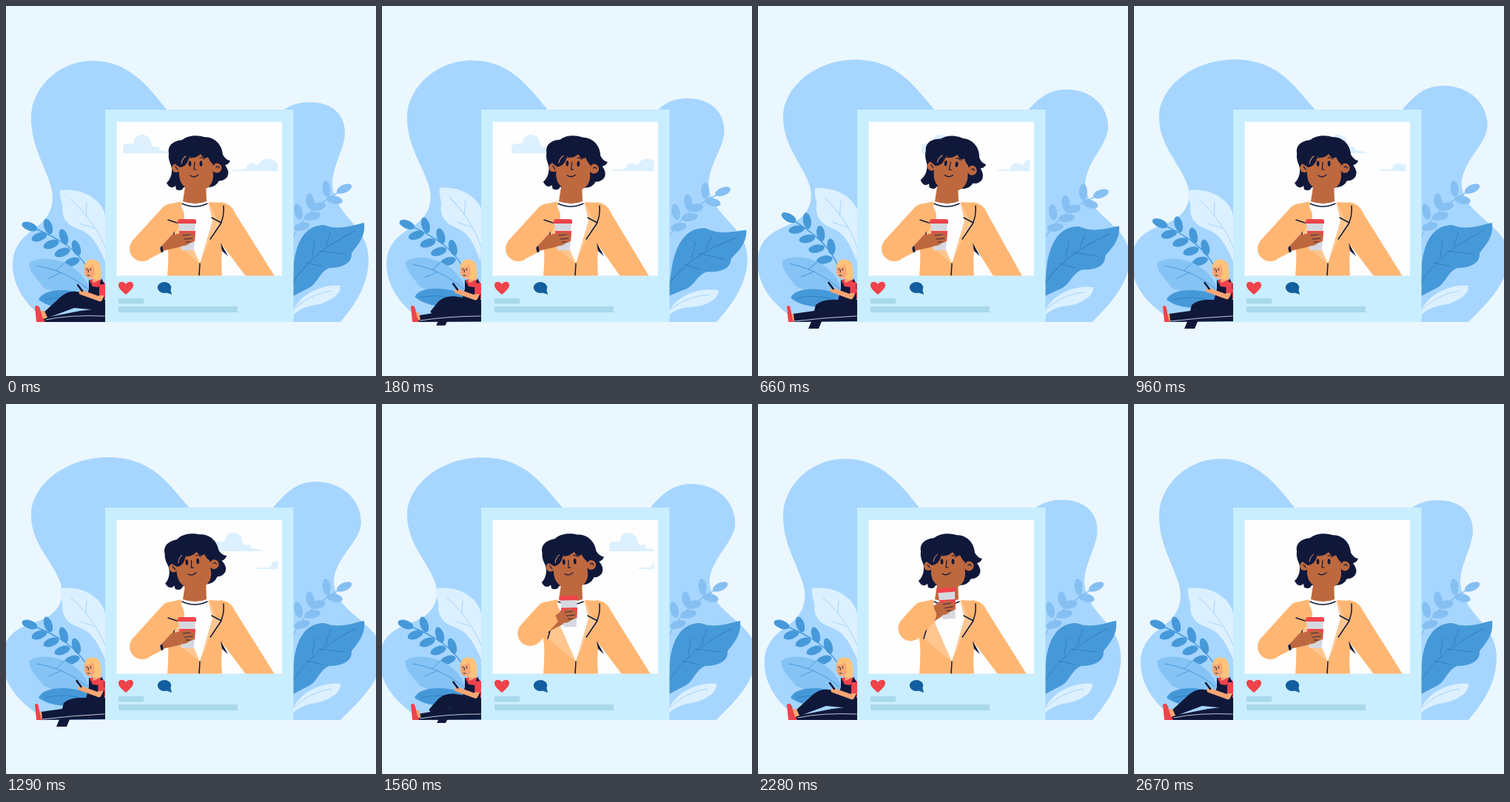
Recreate the animation shown at these times as an HTML page. Size 500x500 px, loop 2.73 s.

```html
<!DOCTYPE html>
<html lang="en">
<head>
<meta charset="utf-8">
<style>
html, body { margin: 0; width: 100%; height: 100%; overflow: hidden; background: #ebf7ff; }
svg { display: block; width: 100%; height: 100%; }
.line { fill: none; stroke-linecap: round; stroke-linejoin: round; }
.flat { stroke-linecap: butt; }
</style>
</head>
<body>
<svg viewBox="0 0 500 500">
  <clipPath id="photo"><path d="M149.500 156.500H373V364.500H149.500Z"/></clipPath>
  <clipPath id="sky"><path d="M158 156H367.500V240H158Z"/></clipPath>
  <path id="blob" fill="#a6d6ff"/>

  <g id="paleLeaf">
    <path fill="#dcf0ff" d="M134 345V283C130 262 105 245 73 249C72 262 78 267 76 276C78 296 92 299 104 304C118 311 125 325 134 345Z"/>
    <path class="line" stroke="#a6d6ff" d="M87 261C110 282 124 302 134 326M108 284L109 265M120 300L99 294"/>
  </g>
  <g id="twig" fill="#4699d9">
    <path class="line" stroke="#4699d9" stroke-width="1.500" d="M35 299C70 313 95 328 110 354"/>
  </g>
  <g id="blueLeaf">
    <path fill="#86c3f5" d="M31 348C39 339 68 338 90 353C105 363 114 378 114 389C94 390 62 388 50 380C44 370 32 362 31 348Z"/>
    <path class="line" stroke="#4699d9" d="M42 351C70 356 90 366 110 382M68 357L78 348M75 360L58 368"/>
  </g>
  <g id="lowLeaf">
    <path fill="#4699d9" d="M44 397C50 382 84 380 114 391V405C85 411 58 408 44 397Z"/>
    <path class="line" stroke="#2f7fc2" d="M52 397Q80 390 110 399"/>
  </g>
  <g id="rightTwig" fill="#86c0f3">
    <path class="line" stroke="#86c0f3" stroke-width="1.500" d="M388 312C402 282 428 262 462 245"/>
  </g>
  <g id="darkLeaf">
    <path fill="#4699d9" d="M386 393L389 347C393 318 404 296 430 296C450 304 468 296 484 293C486 312 476 322 467 334C468 350 450 354 437 354C422 360 422 376 407 382Z"/>
    <path class="line" stroke="#2f7fc2" d="M472 304C435 322 405 345 388 374M432 325L438 306M414 339L417 316M423 331L458 335M405 347L428 352"/>
  </g>
  <g id="whiteLeaf">
    <path fill="#dcf0ff" d="M386 419C390 394 423 375 452 378C453 392 432 403 412 405Q398 408 386 419Z"/>
    <path class="line" stroke="#a6d6ff" d="M440 385Q410 389 388 411"/>
  </g>

  <g id="reader">
    <path id="flatLeg" fill="#10183a"/>
    <path id="calf" fill="#10183a"/>
    <path id="bentLeg" fill="#10183a"/>
    <path id="seam" class="line" stroke="#e8f4ff" stroke-width=".8"/>
    <path id="ankle" fill="#f9a674"/>
    <path id="shoe" fill="#f0434c"/>
    <path fill="#f0434c" d="M112 371Q123 364 134 375V396L112 394Z"/>
    <path fill="#10183a" d="M112 369L117 379L125 380L129 368L133 376V402H107L112 382Z"/>
    <path fill="#f9a674" d="M115 364H125V371L118 374Z"/>
    <path fill="#ffc27a" d="M106 351C108 341 121 340 126 347C129 355 129 363 128 369C122 372 117 369 113 362Z"/>
    <path fill="#f9a674" d="M106 352Q113 354 118 349L120 361C118 370 108 370 106 361Z"/>
    <path class="line" stroke="#10183a" stroke-width=".9" d="M109.500 355V357M114.500 355V357M110 364L113 364M112 356L111 360"/>
    <g id="arms">
      <path class="line" stroke="#f9a674" stroke-width="6.500" d="M131 388L127 396L102 387"/>
      <path class="line flat" stroke="#f0434c" stroke-width="8" d="M130 376V391"/>
      <path class="line" stroke="#10183a" stroke-width="2.500" d="M97 377L103 385"/>
    </g>
  </g>

  <path fill="#c9eeff" d="M134 140H388.500V427H134Z"/>
  <path fill="#fefefe" d="M149.500 156.500H373V364.500H149.500Z"/>
  <g clip-path="url(#sky)" fill="#dcf0ff">
    <path id="cloud" d="M158 199V190Q160 185 167 186Q172 187 173 183C175 171 193 171 196 184Q196 189 200 191Q207 188 208 195Q220 196 224 199Z"/>
    <path id="farCloud" d="M305 223Q307 220 321 221Q325 220 326 215Q330 210 338 214Q342 215 344 210Q350 205 358 207Q365 209 367 214Q380 212 392 223Z"/>
  </g>
  <g clip-path="url(#photo)">
    <path id="farArm" fill="#ffb673"/>
    <path fill="#ffb673" d="M207 279Q214 267 239 264L270 265Q288 265 300 268L293 318Q290 340 292 365H218Q221 330 217 312Z"/>
    <path fill="#fefefe" d="M237 264L273 264L283 286L262 348L238 300Z"/>
    <path fill="#be683f" d="M243 238H270L271 264Q256 270 239 264Z"/>
    <path class="line" stroke="#10183a" stroke-width="1.400" d="M238 267Q255 275 272 267"/>
    <path fill="#ffc68f" d="M237 265L231 293L224 317L262 348L240 298ZM273 265L284 287L291 292L276 315L262 348L279 290Z"/>
    <path class="line" stroke="#10183a" stroke-width="1.500" d="M229 300L224 317M294 270Q295 284 290 294M278 286L291 293L276 315M262 348L261 364"/>
    <path fill="#10183a" d="M290 320L300 338L292 331Z"/>
    <g id="head">
      <path fill="#10183a" d="M220 199C218 187 228 182 238 181C248 173 262 175 268 177C283 177 292 188 293 201Q297 208 303 209Q301 214 296 215Q303 224 299 231Q294 237 288 236Q283 246 270 245L240 245Q238 251 230 248L229 243Q222 249 217 239C224 233 226 221 222 213Q219 206 220 199Z"/>
      <circle cx="230" cy="219" r="6" fill="#be683f"/>
      <circle cx="285" cy="219" r="6.500" fill="#be683f"/>
      <path fill="#be683f" d="M233 200Q250 192 279 201L280 231C279 244 269 250 257 250C244 249 235 242 234 229Z"/>
      <path fill="#10183a" d="M229 214Q229 195 240 192L270 192Q285 196 282 215Q276 212 273 204Q268 209 263 200Q254 208 248 203Q245 217 235 218Z"/>
      <path class="line" stroke="#d99577" d="M237 213Q238 206 243 203"/>
      <path class="line" stroke="#10183a" stroke-width="1.200" d="M255 211L254 221L257 221M249 229Q254 233 260 228M245 207Q248 203 251 205M262 205Q266 204 268 207M284 218Q287 215 288 219M229 217L232 221"/>
      <ellipse cx="248.500" cy="213" rx="1.900" ry="3.800" fill="#10183a"/>
      <ellipse cx="263.500" cy="213" rx="1.900" ry="3.800" fill="#10183a"/>
    </g>
    <path id="forearm" class="line" stroke="#be683f" stroke-width="18"/>
    <path id="cuff" class="line flat" stroke="#10183a" stroke-width="21"/>
    <path id="sleeve" class="line" stroke="#ffb673" stroke-width="34"/>
    <path id="sleeveEnd" fill="#ffb673"/>
    <path id="crease" class="line" stroke="#10183a" stroke-width="1.500" d="M219 289L231 293"/>
    <g id="cup">
      <path fill="#d5d9df" d="M233 293H256L254 330H237Z"/>
      <path fill="#f0434c" d="M234 304H256L255 318H235ZM232 291Q232 288 236 288H254Q257 288 257 291V294H232Z"/>
      <path fill="#be683f" d="M226 314Q234 307 248 305Q251 306 249 309L255 309Q257 312 253 314L254 317Q253 320 249 320Q242 326 230 324Z"/>
      <path class="line" stroke="#10183a" stroke-width=".8" d="M239 310L249 309M241 315L252 314M243 319L249 319"/>
    </g>
  </g>
  <path fill="#f0434c" d="M162 390C155 384 152 381 152 377C152 372 159 371 162 376C165 371 172 372 172 377C172 381 169 384 162 390Z"/>
  <g fill="#135f9f">
    <ellipse cx="214" cy="380.500" rx="9.200" ry="7.500"/>
    <path d="M222 382L224 390L216 387Z"/>
  </g>
  <path fill="#a9d9ec" d="M152 395H186V402.500H152ZM152 406H313V414H152Z"/>
</svg>
<script>
const LOOP = 2730;
const $ = id => document.getElementById(id);
const set = (id, name, value) => $(id).setAttribute(name, value);
const lerp = (a, b, k) => a + (b - a) * k;
const smooth = (a, b, t) => {
  const x = Math.min(1, Math.max(0, (t - a) / (b - a)));
  return x * x * (3 - 2 * x);
};
// Blends two paths that share the same commands.
const blend = ([from, to], k) => {
  const ends = to.match(/-?[\d.]+/g);
  let i = 0;
  return from.replace(/-?[\d.]+/g, n => lerp(+n, +ends[i++], k).toFixed(2));
};
const swing = (t, span) => t < span ? Math.sin(Math.PI * t / span) ** 2 : 0;
const turn = (id, angle, x, y) => set(id, 'transform', `rotate(${angle} ${x} ${y})`);

const blob = [
  'M60 427C36 414 9 385 9 350C9 324 24 311 42 298C58 287 67 268 61 245C54 218 34 190 34 152C34 110 72 74 117 74C165 74 192 108 217 140L300 200L376 140C386 133 397 130 411 130C440 130 458 146 458 171C458 192 441 216 441 241C443 284 490 296 490 342C490 380 468 408 452 427Z',
  'M56 427C26 410 -4 385 -5 345C-4 305 26 300 47 292C70 283 80 265 74 243C64 212 34 190 34 150C34 110 80 72 138 72C200 72 222 112 248 140L300 200L361 140C380 117 395 105 419 105C455 105 480 130 480 160C480 185 446 206 443 238C442 284 508 294 508 338C508 378 470 408 452 427Z'
];
const legs = {
  flatLeg: ['M134 427L50 427L49 422L100 412L134 408Z', 'M134 426L48 427L47 416L90 410L134 404Z'],
  bentLeg: ['M134 397L96 386Q84 384 74 393L51 414L55 422L92 408L134 412Z', 'M134 397L98 397Q84 398 78 404L76 412L80 417L92 415L134 412Z'],
  calf: ['M82 424L80 426L90 426L92 424Z', 'M73 424L68 436L82 436L87 424Z'],
  seam: ['M54 424Q85 417 133 419', 'M49 426Q90 421 133 419'],
  ankle: ['M46 412L52 412L56 421L48 424Z', 'M42 414L48 416L49 426L44 427Z'],
  shoe: ['M39 406Q44 403 46 409L49 420L53 427L41 427Z', 'M39 406Q43 403 44 409L46 420L48 427L41 427Z']
};

function addLeaves(id, leaves) {
  $(id).innerHTML += leaves.map(([x, y, angle]) =>
    `<ellipse rx="11" ry="5.500" transform="translate(${x} ${y}) rotate(${angle})"/>`).join('');
}
addLeaves('twig', [[32, 298, 20], [57, 298, 72], [78, 312, 72], [95, 327, 72],
  [45, 312, -20], [61, 322, -20], [76, 333, -20], [89, 346, -20]]);
addLeaves('rightTwig', [[457, 247, -25], [433, 247, 85], [411, 264, 80], [395, 278, 75],
  [444, 262, 12], [421, 271, -12], [414, 284, -12], [400, 298, -15]]);

function draw(t) {
  const swell = t < 1365 ? Math.sin(Math.PI * t / LOOP) : 1 - smooth(1330, 2380, t);
  set('blob', 'd', blend(blob, swell));

  turn('paleLeaf', 8.5 * swing(t, 820), 134, 330);
  turn('twig', 9.8 * swing(t, 1200), 108, 350);
  turn('blueLeaf', 4 * swing(t, 900), 112, 380);
  turn('lowLeaf', 8 * swing(t, 800), 112, 400);
  turn('rightTwig', 9 * swing(t, 920), 388, 318);
  turn('darkLeaf', 12.5 * swing(t, 780), 388, 385);
  turn('whiteLeaf', 12 * swing(t, 760), 388, 413);

  const stretch = smooth(0, 330, t) - smooth(1380, 1740, t);
  for (const id in legs) set(id, 'd', blend(legs[id], stretch));
  set('arms', 'transform', `translate(${-1.5 * stretch} ${-3 * stretch})`);

  set('cloud', 'transform', `translate(${0.0955 * t})`);
  set('farCloud', 'transform', `translate(${59 * Math.min(1, t / 2280)})`);

  const tilt = 6 * smooth(0, 450, t) - 11 * smooth(700, 1200, t) + 5 * smooth(1400, 1800, t);
  turn('head', tilt, 256, 262);
  const reach = 363 - Math.max(0, tilt);
  set('farArm', 'd', `M288 265Q304 266 309 279L${reach} 365H${reach - 39}L290 320Z`);

  // Lifts the cup to the mouth and back, with the elbow following.
  const lift = smooth(1380, 1780, t) - smooth(2000, 2640, t);
  const dx = 19 * lift, dy = -67 * lift;
  set('cup', 'transform', `translate(${dx} ${dy}) rotate(${-20 * lift ** 3} 245 310)`);
  const elbow = [lerp(184, 222, lift), lerp(328, 286, lift)];
  const hand = [237 + dx, 316 + dy];
  const length = Math.hypot(hand[0] - elbow[0], hand[1] - elbow[1]);
  const along = (k, side = 0) => [
    lerp(elbow[0], hand[0], k) - side * (hand[1] - elbow[1]) / length,
    lerp(elbow[1], hand[1], k) + side * (hand[0] - elbow[0]) / length
  ];
  set('forearm', 'd', `M${elbow}L${hand}`);
  set('cuff', 'd', `M${along(.35)}L${along(.5)}`);
  set('sleeve', 'd', `M224 284L${elbow}`);
  set('sleeveEnd', 'd', `M${along(0, -17)}L${along(.44, -12)}L${along(.44, 11)}L${along(0, 17)}Z`);
  set('crease', 'opacity', 1 - Math.min(1, lift * 3));
}

const start = performance.now();
function frame() {
  draw((performance.now() - start) % LOOP);
  requestAnimationFrame(frame);
}
frame();
</script>
</body>
</html>
```
